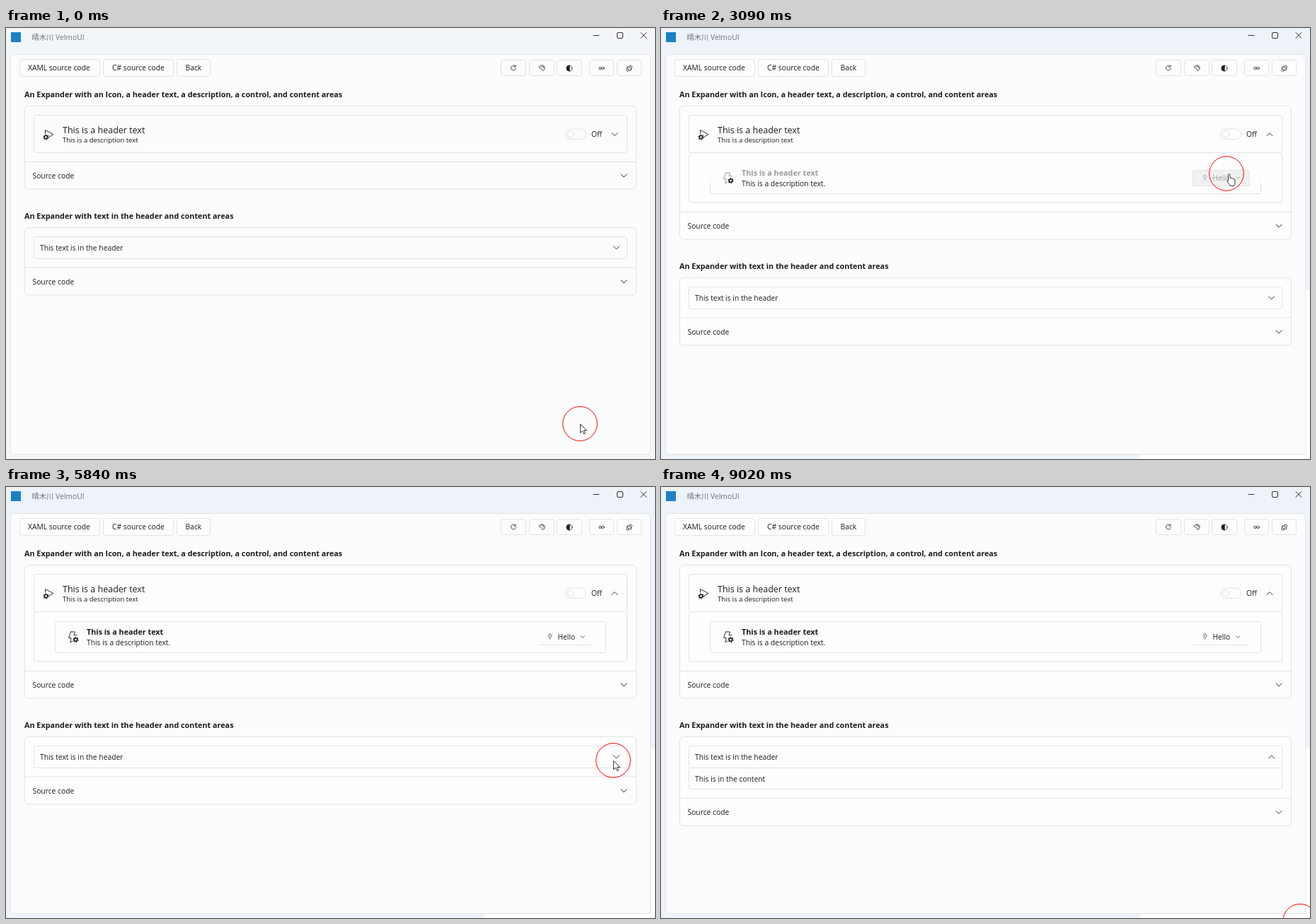
Recreate the animation shown at these times as an HTML page. Size 917 by 610 pixels, loop 9.17 s.

```html
<!DOCTYPE html>
<html lang="en">
<head>
<meta charset="utf-8">
<title>Expander demo</title>
<style>
  html, body { margin: 0; width: 100%; height: 100%; overflow: hidden; background: #edf3f8; }
  svg { display: block; width: 100%; height: 100%; }
  text { font: 10.3px "Open Sans", "Noto Sans", sans-serif; fill: #1c1c1c; white-space: pre; }
  .bold { font-weight: 700; font-size: 10.8px; }
  .title { font-size: 12.5px; }
  .small { font-size: 9.5px; }
  .caption { font: 10.3px "Open Sans", "Noto Sans CJK SC", "Noto Sans CJK", sans-serif; fill: #6f7478; }
  .code text { font: 9.11px "DejaVu Sans Mono", monospace; fill: #800080; }
  .code .attr { fill: #f00; }
  .code .value { fill: #00f; }
  .frame { fill: #edf3f8; }
  .page { fill: #fcfcfc; stroke: #e1e5e7; }
  .box { fill: #fdfdfd; stroke: #e2e3e3; }
  .rule { stroke: #e2e3e3; fill: none; }
  .icon { fill: none; stroke: #333; stroke-linecap: round; stroke-linejoin: round; }
  .idle .frame { fill: #f2f6f8; }
  .idle .page, .idle .box { fill: #fafdfc; }
  .idle .corner { display: none; }
  .pressed .fade { fill: #9b9b9b; }
  .pressed .icon { stroke: #9b9b9b; }
  .pressed .edge { stroke: url(#lowerEdge); }
  .pressed .drop { fill: #f1f1f1; stroke: #e4e4e4; }
  .drop { fill: none; stroke: none; }
</style>
</head>
<body>
<svg id="window" viewBox="0 0 917 610" xmlns="http://www.w3.org/2000/svg">
  <defs>
    <linearGradient id="lowerEdge" x1="0" y1="0" x2="0" y2="1">
      <stop offset=".5" stop-color="#ddd" stop-opacity="0"/>
      <stop offset=".75" stop-color="#ddd"/>
    </linearGradient>
    <clipPath id="page"><rect x="7" y="78" width="903" height="522"/></clipPath>
    <clipPath id="underHeader"><rect x="27" y="176" width="863" height="80"/></clipPath>
    <clipPath id="underSource"><rect x="20" y="228" width="880" height="400"/></clipPath>
    <clipPath id="underText"><rect x="27" y="326" width="863" height="60"/></clipPath>
    <clipPath id="codeView"><rect x="30" y="228" width="840" height="293"/></clipPath>
    <g id="gear">
      <circle r="2.2" fill="none" stroke="#1c1c1c" stroke-width="1.6"/>
      <circle r="3.5" fill="none" stroke="#1c1c1c" stroke-width="1.2" stroke-dasharray="1.7 1.965"/>
    </g>
  </defs>

  <!-- window -->
  <rect class="frame" width="917" height="610"/>
  <path class="corner" d="M911 368l6 4V610H672l8-6H911z" fill="#fff"/>
  <rect class="page" x="6.5" y="37.5" width="904" height="566" rx="5"/>
  <rect x="7" y="6" width="14" height="14" fill="#1c80c6"/>
  <text class="caption" x="36.5" y="16.5">晴木川 VelmoUI</text>
  <path class="icon" d="M830 10.5h8M897 6.5l8 8m0-8l-8 8"/>
  <rect class="icon" x="863.5" y="6.5" width="8" height="8" rx="1.5"/>
  <g id="toolbar"></g>
  <g class="icon" stroke-width=".9">
    <path d="M719.5 54a3.5 3.5 0 1 0 1 3M720 53v2h-2.5"/>
    <path d="M753.5 55a4 4 0 1 1 5 5.5c-2 0 0-2.5-2-3s-2.5-.5-3-2.5m3-.5a2 2 0 0 1 3 2"/>
    <circle cx="796" cy="57" r="4"/><path d="M796 53a4 4 0 0 0 0 8z" fill="#222"/>
    <circle cx="839.5" cy="57" r="1.7"/><circle cx="843.5" cy="57" r="1.7"/>
    <rect x="880.5" y="53.5" width="4" height="3" rx="1"/><circle cx="878.5" cy="59.5" r="1.7"/>
    <path d="M880.5 55h-3v2.5m3 2h3v-3"/>
  </g>

  <g clip-path="url(#page)">
    <text class="bold" x="26" y="98">An Expander with an Icon, a header text, a description, a control, and content areas</text>

    <!-- first sample -->
    <rect id="card1" class="box" x="26.5" y="110.5" width="864" height="117.5" rx="5"/>
    <rect class="box" x="39.5" y="123.5" width="838" height="53" rx="3"/>
    <path class="icon" d="M55.5 149v-4.5l11.5 6-6.5 4"/>
    <use href="#gear" x="56.5" y="154.5"/>
    <text class="title" x="80" y="148.7">This is a header text</text>
    <text class="small" x="80" y="162">This is a description text</text>
    <rect class="box" x="790.5" y="143" width="29" height="14.5" rx="7.25"/>
    <circle class="rule" cx="798" cy="150.2" r="4.7"/>
    <text x="827" y="154">Off</text>
    <path id="chevron1" class="icon" d="M-4-2L0 2 4-2"/>
    <g clip-path="url(#underHeader)">
      <g id="item">
        <rect class="box" x="39.5" y="176.5" width="838" height="70.5" rx="3"/>
        <rect class="box edge" x="69.5" y="190.5" width="778" height="44" rx="3"/>
        <path class="icon" d="M91.5 205h6l-1.5 4.5h4M91.5 205l-3 8.5h3.5l-1 6.5 3-2"/>
        <use href="#gear" x="98.5" y="216"/>
        <text class="bold fade" x="114" y="209">This is a header text</text>
        <text x="114" y="224">This is a description text.</text>
        <rect class="drop" x="751.5" y="201.5" width="80" height="22" rx="3"/>
        <path class="rule" d="M752 223.5h78"/>
        <path class="icon" stroke-width=".8" d="M766 210c1-3 5-2 5 0s-2 1.5-2 3 .5 2-1 2.5M768 210l-1 3"/>
        <text class="fade" x="779.5" y="216">Hello</text>
        <path class="icon" stroke-width=".8" d="M812.5 211l2.5 2.5 2.5-2.5"/>
      </g>
    </g>
    <rect id="highlight" x="38.5" y="123" width="840" height="125.5" fill="none" stroke="#f88" stroke-width="2" opacity=".85"/>

    <!-- source of the first sample -->
    <g id="source1">
      <path class="rule" d="M27 189.5H890"/>
      <text x="37.5" y="212.7">Source code</text>
      <path id="chevron2" class="icon" d="M-4-2L0 2 4-2"/>
      <g clip-path="url(#underSource)">
        <g id="code" class="code">
          <rect class="box" x="26.5" y="228" width="864" height="317.5" rx="5"/>
          <g id="codeLines" clip-path="url(#codeView)"></g>
          <rect x="872.5" y="246" width="3" height="71" rx="1.5" fill="#c9c9c9"/>
        </g>
      </g>
    </g>

    <!-- second sample -->
    <g id="sample2">
      <text class="bold" x="26" y="270">An Expander with text in the header and content areas</text>
      <rect id="card2" class="box" x="26.5" y="282.5" width="864" height="95.5" rx="5"/>
      <g id="textExpander">
        <rect class="box edge" x="39.5" y="295.5" width="838" height="31" rx="3"/>
        <text class="fade" x="48" y="315">This text is in the header</text>
        <path id="chevron3" class="icon" d="M-4-2L0 2 4-2"/>
        <g clip-path="url(#underText)">
          <g id="textContent">
            <rect class="box edge" x="39.5" y="326.5" width="838" height="30" rx="3"/>
            <text class="fade" x="48" y="345.5">This is in the content</text>
          </g>
        </g>
      </g>
      <g id="source2">
        <path class="rule" d="M27 339H890"/>
        <text x="37.5" y="362.7">Source code</text>
        <path class="icon" d="M869 357l4 4 4-4"/>
      </g>
    </g>
  </g>

  <g id="pointer">
    <circle r="24.3" fill="none" stroke="#f00"/>
    <path id="arrow" d="M.5.5v12.5l3-2.8 2 4.5 2-.9-2-4.3h4z" fill="#fff" stroke="#222" stroke-width=".9"/>
    <path id="hand" d="M2.5 1.5q1.5-1.5 2.5 0v5q1.5-1 2.5.5 1.5-.8 2.3.6 2-.4 2.2 1.4v4q-.3 2-1.5 4.5H5.5q-1-2.5-4.5-6 .2-2 1.5-1z" fill="#fff" stroke="#222" stroke-width=".9"/>
  </g>
</svg>

<script>
const LOOP = 9170;
const OPEN_MS = 333, CLOSE_MS = 167, COLLAPSE_MS = 200;
const $ = id => document.getElementById(id);
const move = (id, x, y, turn = 0) => $(id).setAttribute('transform', `translate(${x} ${y}) rotate(${turn})`);
const show = (id, on) => $(id).style.display = on ? '' : 'none';
const clamp = v => Math.min(1, Math.max(0, v));
const within = (t, from, to) => t >= from && t < to;

// Toolbar: x, width and optional label
const buttons = [[19, 114, 'XAML source code', 31], [137, 100, 'C# source code', 150], [241, 48, 'Back', 253.5],
  [699, 36], [739, 36], [778, 36], [824, 35], [863, 35]];
$('toolbar').innerHTML = buttons.map(([x, w, label = '', textX = 0]) =>
  `<rect class="box" x="${x + .5}" y="${label ? 44.5 : 45.5}" width="${w - 1}" height="${label ? 24 : 22}" rx="3"/>
   <text x="${textX}" y="60">${label}</text>`).join('');

const markup = `<Grid
 >
  <Grid.ColumnDefinitions>
    <ColumnDefinition
      Width="*" />
    <ColumnDefinition
      Width="Auto" />
  </Grid.ColumnDefinitions>
  <ui:CardExpander
    Grid.Column="0"
    Icon="{ui:SymbolIcon PlaySettings20}"
   >
    <ui:CardExpander.Header>
      <Grid>
        <Grid.RowDefinitions>
          <RowDefinition
            Height="Auto" />
          <RowDefinition
            Height="Auto" />
        </Grid.RowDefinitions>
        <Grid.ColumnDefinitions>
          <ColumnDefinition
            Width="*" />
          <ColumnDefinition
            Width="Auto" />`;
const escapeTag = s => s.replace(/</g, '&lt;').replace(/>/g, '&gt;');
$('codeLines').innerHTML = markup.split('\n').map((line, i) => {
  const indent = line.search(/\S/);
  const colored = escapeTag(line.trim()).replace(/([\w.]+)(="[^"]*")/,
    '<tspan class="attr">$1</tspan><tspan class="value">$2</tspan>');
  return `<text x="${49.2 + indent * 5.485}" y="${247.6 + i * 11.69}">${colored}</text>`;
}).join('');

// Solves a cubic Bezier easing with control points (x1, y1) and (x2, y2)
function bezier(x1, y1, x2, y2) {
  const at = (a, b, s) => 3 * a * s * (1 - s) ** 2 + 3 * b * s * s * (1 - s) + s ** 3;
  return x => {
    let low = 0, high = 1;
    for (let i = 0; i < 24; i++) {
      const mid = (low + high) / 2;
      at(x1, x2, mid) < x ? low = mid : high = mid;
    }
    return at(y1, y2, low);
  };
}
const easeOpen = bezier(0, 0, 0, 1), easeClose = bezier(1, 1, 0, 1);

// Alternating open and close times
const toggles = { item: [1360, 2200, 2740], code: [3917, 4360, 4783, 5220], text: [6815, 7800, 8200] };

function expander(times, t) {
  const past = times.filter(start => start <= t);
  if (!past.length) return { laidOut: false, shown: 0, turn: 0 };
  const age = t - past[past.length - 1];
  const chevron = clamp(age / CLOSE_MS);
  return past.length % 2
    ? { laidOut: true, shown: easeOpen(clamp(age / OPEN_MS)), turn: 180 * chevron }
    : { laidOut: age < COLLAPSE_MS, shown: 1 - easeClose(clamp(age / CLOSE_MS)), turn: 180 * (1 - chevron) };
}

// Pointer stops: time, x, y
const path = [[50, 811, 560], [380, 345, 400], [720, 892, 260], [950, 860, 178], [1000, 860, 178],
  [1160, 860, 150], [1360, 860, 150], [1500, 857, 151], [2740, 857, 151], [3060, 799, 206], [3600, 799, 206],
  [3900, 872, 289], [4300, 872, 289], [4800, 872, 283], [5220, 872, 283], [5480, 858, 436], [5540, 858, 436],
  [5840, 858, 387], [6140, 858, 387], [6400, 869, 436], [6690, 861, 386], [7440, 861, 386], [7540, 863, 386],
  [8200, 863, 386], [8560, 893, 567], [8810, 893, 567], [9020, 903, 614.5]];

function pointerAt(t) {
  const next = path.findIndex(stop => stop[0] > t);
  if (next === 0) return path[0].slice(1);
  if (next < 0) return path[path.length - 1].slice(1);
  const [t0, x0, y0] = path[next - 1], [t1, x1, y1] = path[next];
  const p = (t - t0) / (t1 - t0), k = p * p * (3 - 2 * p);
  return [x0 + (x1 - x0) * k, y0 + (y1 - y0) * k];
}

function draw(t) {
  const item = expander(toggles.item, t);
  const code = expander(toggles.code, t);
  const text = expander(toggles.text, t);
  const itemHeight = item.laidOut ? 71 : 0;
  const codeHeight = code.laidOut ? 317.5 : 0;
  const textHeight = text.laidOut ? 30.5 : 0;

  $('window').classList.toggle('idle', t < 50);

  show('item', item.laidOut);
  move('item', 0, -70.5 * (1 - item.shown));
  move('chevron1', 860, 150.5, item.turn);
  $('card1').setAttribute('height', 117.5 + itemHeight);
  $('item').classList.toggle('pressed', within(t, 3040, 3400));
  show('highlight', within(t, 4000, 4620));

  move('source1', 0, itemHeight);
  show('code', code.laidOut);
  move('code', 0, -317.5 * (1 - code.shown));
  move('chevron2', 873, 209, code.turn);

  move('sample2', 0, itemHeight + codeHeight);
  show('textContent', text.laidOut);
  move('textContent', 0, -30 * (1 - text.shown));
  move('chevron3', 862.5, 311, text.turn);
  move('source2', 0, textHeight);
  $('card2').setAttribute('height', 95.5 + textHeight);
  $('textExpander').classList.toggle('pressed', within(t, 6840, 7240) || within(t, 7440, 7540));

  move('pointer', ...pointerAt(t));
  const overButton = within(t, 3000, 3650);
  show('hand', overButton);
  show('arrow', !overButton);
}

function tick(now) {
  draw(now % LOOP);
  requestAnimationFrame(tick);
}
draw(0);
requestAnimationFrame(tick);
</script>
</body>
</html>
```
